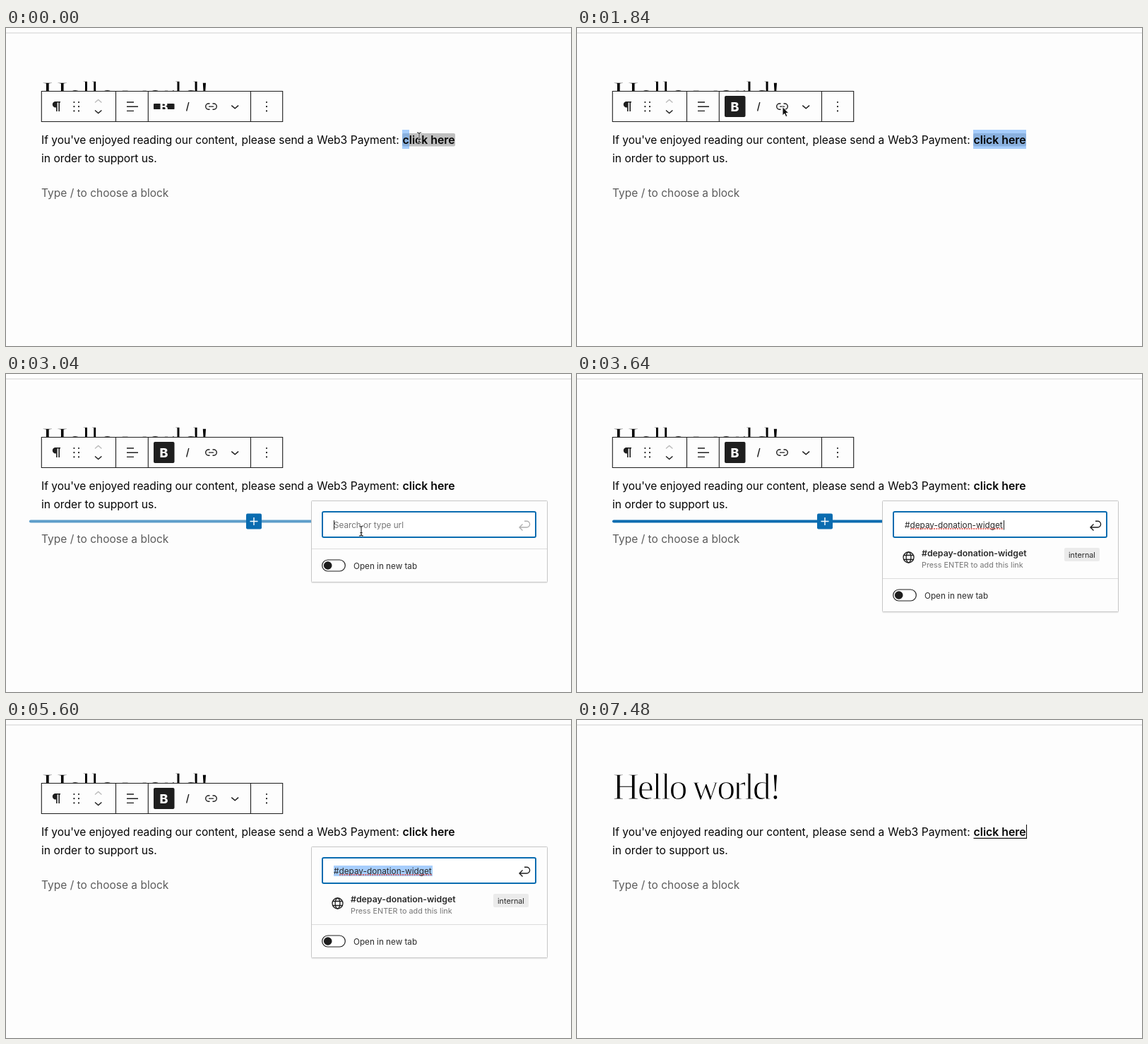
An HTML page for the animation above (7880 ms loop, 800 by 450 pixels).

```html
<!DOCTYPE html>
<html lang="en">
<head>
<meta charset="utf-8">
<title>Adding a link</title>
<style>
html, body { margin: 0; width: 100%; height: 100%; overflow: hidden; background: #fdfdfd; }
svg { display: block; width: 100vw; height: 100vh; font-family: Inter, "Open Sans", sans-serif; }
.title { font: 52px "Liberation Serif", serif; letter-spacing: -2.4px; stroke: #fdfdfd; stroke-width: 1.25; }
.body { font-size: 15.5px; fill: #050505; }
.wide { font-size: 15.65px; }
.bold { font-weight: 600; }
.ui { font-size: 11.7px; fill: #2a2a2a; }
.small { font-size: 10.8px; }
.grey { fill: #757575; }
.ico { fill: none; stroke: #1e1e1e; stroke-width: 1.4; }
.sel { fill: rgb(95,166,249); fill-opacity: .55; }
</style>
</head>
<body>
<svg viewBox="0 0 800 450">
  <rect width="800" height="450" fill="#fdfdfd"/>
  <path d="M0 7H800" stroke="#e0e0e0" stroke-width="1.6"/>

  <g class="title" fill="#000"><text x="50.5" y="112">Hello</text><text x="163" y="112">world!</text></g>

  <rect id="focus" x="561" y="149" width="75" height="18.5" rx="2" fill="#bfbfbf"/>
  <rect id="pick" class="sel" x="561" y="144" height="27"/>
  <g class="body">
    <text y="164"><tspan x="50">If you've enjoyed reading our content,</tspan><tspan x="333.5">please send a</tspan><tspan x="440.3" class="wide">Web3 Payment:</tspan></text>
    <text x="561.5" y="164" class="bold" style="font-size:15.85px">click here</text>
    <text x="50" y="190" class="wide">in order to support us.</text>
    <text x="50" y="239" fill="#5c5c5c">Type / to choose a block</text>
  </g>
  <path id="linked" d="M561.5 167.4H636.5V148" fill="none" stroke="#111" stroke-width="1.1"/>

  <g id="bar">
    <path d="M50.3 89.5H391.7V132.5H50.3ZM155.5 89.5V132.5M201.3 89.5V132.5M346.5 89.5V132.5" fill="#fdfdfd" stroke="#1e1e1e" stroke-width="1.1"/>
    <path d="M77 104H70a4.2 4.2 0 0 0 0 8.4H71V118H72.6V105.4H74.4V118H76V105.4H77Z" fill="#1e1e1e"/>
    <path class="ico" style="stroke-width:2.2;stroke-linecap:round" stroke-dasharray="0 6.2" d="M96.4 105V118M103 105V118M369 105V118"/>
    <path class="ico" style="stroke:#bbb" d="M126 105.5L130.7 101.5L135.4 105.5"/>
    <path class="ico" d="M126 116.5L130.7 120.5L135.4 116.5M319.3 109.6L324.2 113.8L329.1 109.6"/>
    <path class="ico" d="M171 105H181M171 111.2H187M171 117.4H181"/>
    <rect id="bold" x="209" y="96" width="29.5" height="30" rx="2" fill="#1e1e1e"/>
    <text x="223.5" y="117.5" text-anchor="middle" font-size="18" font-weight="800" fill="#fdfdfd">B</text>
    <path class="ico" d="M258.8 105L255.6 117.5"/>
    <path class="ico" d="M288.5 107H286.8a4.1 4.1 0 0 0 0 8.2H288.5M292.5 107H294.2a4.1 4.1 0 0 1 0 8.2H292.5M287 111.1H294"/>
  </g>

  <g id="inserter">
    <rect id="line" x="50" y="206.5" width="601" height="4" rx="2" fill="#0a6cb0"/>
    <g id="plus">
      <rect x="340" y="197.5" width="22" height="22" rx="2" fill="#0a6cb0"/>
      <path d="M345.5 208.5H356.5M351 203V214" stroke="#fff" stroke-width="1.4"/>
    </g>
  </g>

  <g id="popup">
    <rect x="432" y="181" width="335" rx="2" id="shade" fill="#000" opacity=".06"/>
    <rect x="432.5" y="179.5" width="334" rx="1" id="frame" fill="#fdfdfd" stroke="#c6c6c6"/>
    <rect x="448" y="195" width="302" height="36" rx="2" fill="#fff" stroke="#0a6cb0" stroke-width="2"/>
    <text id="hint" class="ui grey" x="464" y="218">Search or type url</text>
    <path id="enter" class="ico" d="M731.5 212.5L727 217L731.5 221.5M727.4 217H737.2a4.4 4.4 0 0 0 0 -8.8H734"/>
    <g id="typed">
      <rect id="all" class="sel" x="464" y="206" width="140" height="15"/>
      <text class="ui" style="font-size:11.8px" x="464" y="218">#depay-donation-widget</text>
      <path d="M472 219H604" stroke="#e0413a" stroke-width="1.5" stroke-dasharray="2 1.3"/>
    </g>
    <path id="caret" d="M0 207V220.5" stroke="#222"/>
    <g id="row">
      <rect id="hover" x="447" y="239" width="304" height="44" rx="2" fill="#f0f0f0"/>
      <g class="ico" style="stroke-width:1.3">
        <circle cx="469.5" cy="259.5" r="7.5"/><ellipse cx="469.5" cy="259.5" rx="3.4" ry="7.5"/>
        <path d="M463 256.5H476M463 262.5H476"/>
      </g>
      <text class="ui bold" style="font-size:12.3px" x="488" y="258">#depay-donation-widget</text>
      <text class="ui small grey" x="488" y="273.5">Press ENTER to add this link</text>
      <rect x="690" y="246" width="50" height="19" rx="2" fill="#ebebeb"/>
      <text class="ui small" x="715" y="259.5" text-anchor="middle">internal</text>
    </g>
    <g id="foot">
      <path d="M433 247.5H766" stroke="#dcdcdc"/>
      <rect x="447.7" y="263" width="32.6" height="16" rx="8" fill="#fff" stroke="#1e1e1e" stroke-width="1.2"/>
      <circle cx="455.7" cy="271" r="5.8" fill="#1e1e1e"/>
      <text class="ui" x="492" y="275.5">Open in new tab</text>
    </g>
  </g>

  <path id="arrow" d="M0 0V12.4L2.8 9.8L4.7 14.2L6.9 13.2L5 9H8.8Z" fill="#111" stroke="#fff" stroke-width=".9"/>
  <g id="beam" fill="none">
    <path d="M-3 -7Q0 -7 0 -5Q0 -7 3 -7M0 -5V5M-3 7Q0 7 0 5Q0 7 3 7M-1.6 2.6H1.6" stroke="#fff" stroke-width="2.6"/>
    <path d="M-3 -7Q0 -7 0 -5Q0 -7 3 -7M0 -5V5M-3 7Q0 7 0 5Q0 7 3 7M-1.6 2.6H1.6" stroke="#222" stroke-width="1.1"/>
  </g>
</svg>
<script>
const LOOP = 7880, STEP = 40;
const OPEN = 2160, PASTE = 3600, SELECT = 5440, DONE = 6840, CLEAR = 7160;
const el = {};
document.querySelectorAll('[id]').forEach(n => el[n.id] = n);

const set = (id, attr, v) => el[id].setAttribute(attr, v);
const show = (id, on) => { el[id].style.display = on ? '' : 'none'; };
const within = (t, a, b) => t >= a && t < b;
const clamp = v => Math.max(0, Math.min(1, v));

// Each key is [time, value, value...]; values between keys are linear.
function track(keys, t) {
  const i = keys.findIndex(k => k[0] > t);
  if (i < 0) return keys[keys.length - 1].slice(1);
  if (i === 0) return keys[0].slice(1);
  const a = keys[i - 1], b = keys[i], p = (t - a[0]) / (b[0] - a[0]);
  return a.slice(1).map((v, j) => v + (b[j + 1] - v) * p);
}

const pointer = [
  [0, 585, 155], [240, 618, 155], [480, 635, 157], [840, 636, 158],
  [960, 606, 172], [1080, 500, 163], [1200, 396, 128], [1360, 325, 114],
  [1520, 291, 111], [2280, 291, 112], [2400, 372, 155], [2480, 445.5, 208],
  [2640, 488, 219], [2840, 503, 222], [4240, 503, 222], [4480, 603.5, 216],
  [4640, 612, 218], [4880, 611, 222], [5160, 600, 298]
];
const spring = [[2880, 0], [2960, .6], [3040, 1.057], [3120, 1.073], [3240, 1]];
const letters = [571, 576, 580, 589, 598, 602, 612, 621, 627, 636];

function scaleAt(cx, cy, sx, sy) {
  return `translate(${cx} ${cy}) scale(${sx} ${sy}) translate(${-cx} ${-cy})`;
}

function draw(t) {
  const [x, y] = track(pointer, t);
  const arrow = within(t, 1120, 2560) || within(t, 5000, SELECT);
  const hidden = within(t, PASTE, 4240) || t >= SELECT;
  show('arrow', arrow && !hidden);
  show('beam', !arrow && !hidden);
  set('arrow', 'transform', `translate(${x} ${y})`);
  set('beam', 'transform', `translate(${x} ${y})`);

  show('focus', t < OPEN);
  show('pick', t < OPEN);
  set('pick', 'width', letters[Math.min(9, Math.floor(t / 55))] - 561);
  set('bold', 'transform', scaleAt(224, 111, 1, Math.min(1, .27 + t / 140)));
  show('bar', t < CLEAR);
  show('linked', t >= DONE);

  show('inserter', within(t, 2880, 5120));
  set('inserter', 'opacity', 1 - clamp((t - 4920) / 200));
  set('line', 'transform', scaleAt(351, 208.5, track(spring, t)[0], 1));
  set('line', 'opacity', clamp((t - 2880) / 246));
  const grow = clamp((t - 2880) / 160);
  set('plus', 'transform', scaleAt(351, 208.5, grow, grow));

  const filled = t >= PASTE, rise = filled ? 42 : 0;
  show('popup', within(t, OPEN, DONE));
  set('frame', 'height', 115 + rise);
  set('shade', 'height', 115.5 + rise);
  set('foot', 'transform', `translate(0 ${rise})`);
  show('hint', !filled);
  show('typed', filled);
  show('row', filled);
  show('all', within(t, SELECT, 6200));
  show('hover', within(t, 4960, 5120) || within(t, 6200, DONE));
  el.enter.style.stroke = filled ? '#1e1e1e' : '#b0b0b0';
  const blink = filled ? (t - PASTE) % 1000 < 500 : (t + 100) % 1000 < 500;
  show('caret', blink && t < SELECT);
  set('caret', 'transform', `translate(${filled ? 604.5 : 464.5} 0)`);
}

let start;
function tick(now) {
  if (start === undefined) start = now;
  const t = (now - start) % LOOP;
  draw(Math.floor(t / STEP) * STEP);
  requestAnimationFrame(tick);
}
draw(0);
requestAnimationFrame(tick);
</script>
</body>
</html>
```
